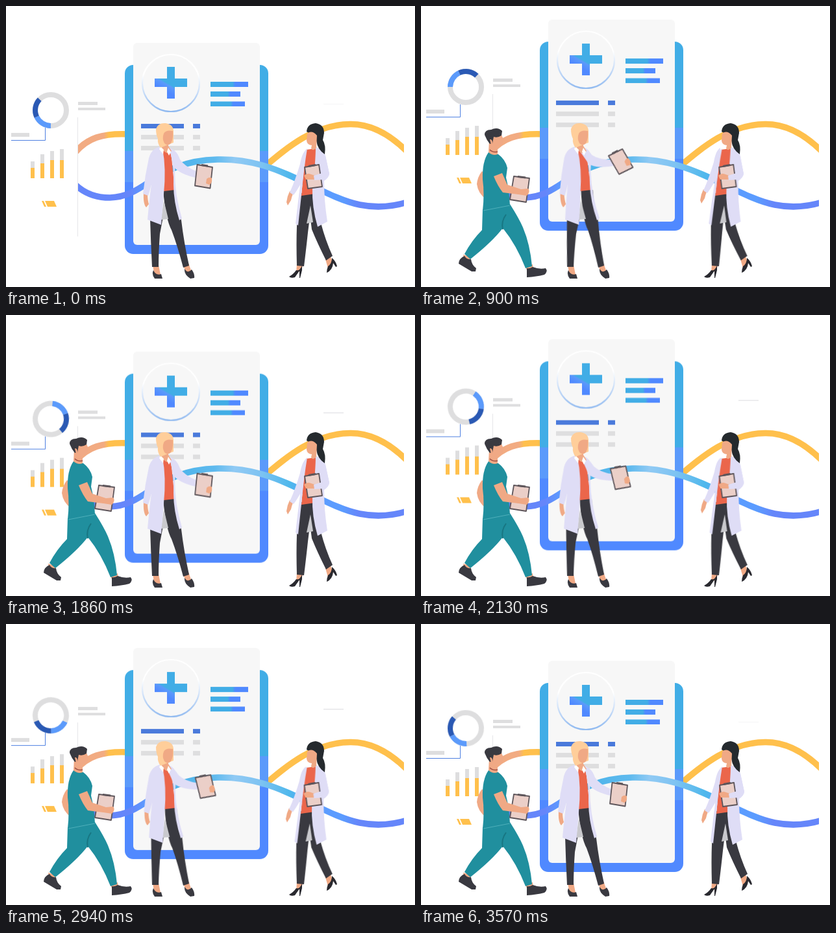
An HTML page for the animation above (3600 ms loop, 630 by 434 pixels).

```html
<!DOCTYPE html>
<html lang="en">
<head>
<meta charset="utf-8">
<title>Medical team</title>
<style>
html, body { margin: 0; width: 100%; height: 100%; overflow: hidden; background: #fff; }
svg { display: block; width: 630px; height: 434px; }

.sway { animation: sway 1800ms infinite; }
@keyframes sway {
  0%, 50% { animation-timing-function: cubic-bezier(.4, 0, .2, 1); }
  50% { transform: var(--to); }
}
.float { --to: translateY(-36px); }
.coatA { --to: skewX(2.1deg); transform-origin: 240px 220px; }
.legsA { --to: skewX(-2.1deg); transform-origin: 240px 405px; }
.armA { --to: translate(-7px, -2px) rotate(-23deg); transform-origin: 258px 228px; }
.boardA { --to: rotate(-13deg); transform-origin: 305px 263px; }
.coatB { --to: skewX(-1.2deg); transform-origin: 470px 210px; }
.armB { --to: translate(-2px, -3px); }
.legsB { --to: skewX(1.2deg); transform-origin: 470px 405px; }

.ring { animation: spin 3600ms linear infinite; transform-origin: 69px 161px; }
@keyframes spin { to { transform: rotate(360deg); } }

.edge { animation: edge 3600ms step-end infinite; }
@keyframes edge { 0% { opacity: .3; } 5% { opacity: 0; } 48% { opacity: 1; } 98% { opacity: .3; } }

.man { animation: enter 3600ms infinite; }
@keyframes enter {
  0% { transform: translateX(-56px); animation-timing-function: ease; }
  19.4%, 100% { transform: none; }
}
.fade { animation: fade 3600ms linear infinite; }
@keyframes fade { 0% { opacity: 0; } 8%, 100% { opacity: 1; } }
.scrub { animation: scrub 3600ms step-end infinite; }
@keyframes scrub { 0% { fill: #42aee4; } 16.7%, 100% { fill: #208f9e; } }

.skin { fill: #f0a985; }
.dark { fill: #393940; }
.coat { fill: #dfddf6; }
.red { fill: #eb664b; }
.grey { fill: #dededf; }
.gold { fill: #ffc04c; }
.teal { fill: #208f9e; }
.board { fill: #ebcfc8; stroke: #5d555a; stroke-width: 1.8; stroke-linejoin: round; }
.line { fill: none; stroke-width: 9.6; }
</style>
</head>
<body>
<svg viewBox="0 0 630 434">
  <defs>
    <linearGradient id="case" x1="0" y1="0" x2="0" y2="1">
      <stop offset=".455" stop-color="#41ade6"/><stop offset=".455" stop-color="#5b9afb"/>
      <stop offset=".62" stop-color="#5b9afb"/><stop offset=".62" stop-color="#5089ff"/>
    </linearGradient>
    <linearGradient id="cross" gradientUnits="userSpaceOnUse" x1="262" y1="104" x2="242" y2="138">
      <stop offset=".5" stop-color="#41ade6"/><stop offset=".56" stop-color="#5b9afb"/>
      <stop offset=".8" stop-color="#5089ff"/>
    </linearGradient>
    <linearGradient id="halo" x1="0" y1="0" x2="0" y2="1">
      <stop offset=".35" stop-color="#fff"/><stop offset="1" stop-color="#8fb9f0"/>
    </linearGradient>
    <linearGradient id="bar">
      <stop offset=".58" stop-color="#41ade6"/><stop offset=".66" stop-color="#5089ff"/>
    </linearGradient>
    <linearGradient id="blue" gradientUnits="userSpaceOnUse" x1="111" y1="0" x2="613" y2="0">
      <stop offset=".16" stop-color="#6586fa"/><stop offset=".21" stop-color="#5b9cff"/>
      <stop offset=".29" stop-color="#4ab3ea"/><stop offset=".42" stop-color="#5fbaee"/>
      <stop offset=".48" stop-color="#90caf4"/><stop offset=".56" stop-color="#7ec3f2"/>
      <stop offset=".65" stop-color="#4fb8ec"/><stop offset=".72" stop-color="#5b9cff"/>
      <stop offset=".81" stop-color="#5b9cff"/><stop offset=".86" stop-color="#6586fa"/>
    </linearGradient>
    <linearGradient id="amber" gradientUnits="userSpaceOnUse" x1="111" y1="0" x2="183" y2="0">
      <stop offset=".55" stop-color="#f2ab82"/><stop offset=".66" stop-color="#ffc04c"/>
    </linearGradient>
    <clipPath id="span"><path d="M111 150H613V330H111Z"/></clipPath>
  </defs>

  <g clip-path="url(#span)">
    <path class="line" stroke="url(#amber)" d="M106 227C125 204 148 196 190 198"/>
    <path class="line" stroke="#ffc04c" d="M396 250C435 217 475 183 530 182.500C562 182 592 199 618 225"/>
  </g>

  <!-- charts -->
  <g class="sway float">
    <path d="M110.500 172V356" stroke="#e6e6e8"/>
    <g class="ring" fill="none" stroke-width="8">
      <circle cx="69" cy="161" r="24" stroke="#dededf"/>
      <path d="M69 185A24 24 0 0 1 47.300 171.100" stroke="#5b9afb"/>
      <path d="M47.300 171.100A24 24 0 0 1 51.700 144.300" stroke="#2a59b4"/>
    </g>
    <path d="M8 207.500H60.500V188" fill="none" stroke="#4c7fe0"/>
    <path class="grey" d="M8 196H36V202H8ZM111 148H141V153H111ZM111 157H153V161H111Z"/>
    <path class="grey" d="M38 240H44V250H38ZM53 229H59V243H53ZM68 224H74V238H68ZM83 221H89V238H83Z"/>
    <path class="gold" d="M38 250H44V266H38ZM53 243H59V266H53ZM68 238H74V266H68ZM83 238H89V266H83Z"/>
    <path class="gold" d="M55 301H58L62 310H59ZM60 301H74L78 310H64Z"/>
  </g>
  <g class="sway float"><path class="edge" d="M489 151.500H520" stroke="#dcdce0"/></g>

  <!-- tablet -->
  <g class="sway float">
    <rect x="183" y="91" width="221" height="292" rx="13" fill="url(#case)"/>
    <rect x="196" y="57" width="195" height="312" rx="6" fill="#f7f7f7"/>
    <circle cx="254" cy="119" r="44" fill="none" stroke="url(#halo)" stroke-width="2.200"/>
    <path d="M248 94H260V112H279V125H260V143H248V125H229V112H248Z" fill="url(#cross)"/>
    <g fill="url(#bar)">
      <rect x="315" y="117" width="58" height="8"/>
      <rect x="315" y="132" width="46" height="8"/>
      <rect x="315" y="147.500" width="53" height="7.500"/>
    </g>
    <path d="M208 182H274V189H208ZM288 182H299V189H288Z" fill="#4a7adb"/>
    <path class="grey" d="M208 199H274V206H208ZM288 199H299V206H288ZM208 216H274V223H208ZM288 216H299V223H288Z"/>
  </g>

  <path clip-path="url(#span)" class="line" stroke="url(#blue)" d="M106 275C122 291 143 296 160 296C202 295 220 265 262 249C300 234 350 233 395 246C450 262 500 298 545 307C570 312 592 311 618 303"/>

  <!-- blonde doctor -->
  <g>
    <path class="skin" d="M226 400H235L238 415L229 418ZM273 400L281 397L286 411L278 415Z"/>
    <path class="dark" d="M227 408Q231 417 239 414L241 421H229Q224 415 227 408ZM275 406Q280 414 286 407Q291 414 290 420L284 421Q274 415 275 406Z"/>
    <g class="sway legsA">
      <path class="dark" d="M222 328L242 326L237 352Q235 380 235 403H225Q223 365 222 328Z"/>
      <path class="dark" d="M242 284H260Q264 315 270 331Q274 365 282 401L273 404Q264 370 255 346Q246 330 242 284Z"/>
    </g>
    <g class="sway coatA">
      <path class="skin" d="M212 288L218 290Q218 300 220 306L216 311Q211 306 212 288Z"/>
      <path fill="#c9c9cd" d="M243 300L250 329L239 330Z"/>
      <path class="red" d="M240 221L254 224L260 284L243 286Z"/>
      <path class="coat" d="M238 217Q224 220 220 235Q214 262 211 290L219 293Q222 284 224 275Q220 305 218 330L239 338L243 290Q247 250 241 220Z"/>
      <path class="coat" d="M250 218Q260 221 262 232L260 255Q260 292 271 328L267 331Q258 302 258 275Q259 240 250 218Z"/>
    </g>
    <g class="sway armA">
      <path class="coat" d="M252 220Q263 222 268 237Q275 248 295 256L292 265Q268 260 258 248Z"/>
      <path class="skin" d="M293 256L314 265L317 271L292 264Z"/>
      <g class="sway boardA">
        <path class="board" d="M294.500 245L318 249L314.500 281.500L291 277.500Z"/>
        <path d="M301 245.500L311 247" stroke="#5d555a" stroke-width="3"/>
        <path class="skin" d="M309 267Q314 263 317 266Q318 274 313 276L308 274Z"/>
      </g>
    </g>
    <path class="skin" d="M240 205H250V216L255 224Q248 232 240 220Z"/>
    <path fill="#fff" d="M238 217L243 222L242 229L236 221ZM250 219L254 225L251 231L248 225Z"/>
    <path fill="#ffce9a" d="M231 190Q234 180 246 181Q259 183 258 196L258 211L250 214L238 219Q233 212 234 205Q231 199 231 190Z"/>
    <path class="skin" d="M243 197Q246 191 257 193Q258 205 254 212Q249 217 244 212Q240 205 243 197Z"/>
  </g>

  <!-- brunette doctor -->
  <g>
    <path class="skin" d="M448 398H458L455 408L447 413ZM492 391L500 387L504 398L496 405Z"/>
    <path fill="#29292f" d="M447 408Q452 410 456 401L456 408L453 420H452V409L445 419Q439 421 436 418Q443 414 447 408ZM496 402Q502 398 502 389Q508 394 510 402L508 403L504 397Q503 408 494 412Q494 407 496 402Z"/>
    <g class="sway legsB">
      <path class="dark" d="M455 289L474 290Q468 320 465 350Q462 378 459 402L448 401Q447 365 448 340Q449 312 455 289Z"/>
      <path class="dark" d="M464 289H476L485 335Q492 362 503 386L493 393Q479 365 471 345Z"/>
    </g>
    <g class="sway armB">
      <path class="skin" d="M437 286L442 290Q440 295 439 300L434 308L432 303Q433 294 437 286Z"/>
      <path class="coat" d="M463 222Q456 226 453 244Q446 268 437 288L443 292Q452 280 459 264Z"/>
    </g>
    <g class="sway coatB">
      <path fill="#c9c9cd" d="M469 308L473 334L463 336Z"/>
      <path class="red" d="M462 222L478 220L476 290L455 293L458 260Z"/>
      <path class="coat" d="M464 220Q457 225 455 240L453 278Q449 308 446 336L450 339L455 292Q459 250 464 220Z"/>
      <path class="coat" d="M477 218Q490 220 492 231L498 259Q497 266 490 270Q490 302 495 333L480 341Q471 310 472 282Q477 240 477 218Z"/>
      <path class="board" d="M460 249L482 245L487 279L465 282Z"/>
      <path d="M466 247.500L477 245.500" stroke="#5d555a" stroke-width="3"/>
      <path class="skin" d="M459 262Q464 257 470 260L476 262L475 268L462 268Z"/>
      <path class="coat" d="M474 262L487 258L485 236L492 231L498 259Q497 266 490 268L475 269Z"/>
    </g>
    <path fill="#252a2e" d="M463 194Q464 182 477 181Q490 183 490 196L488 207Q493 215 491 229Q480 222 478 208L470 198Z"/>
    <path class="skin" d="M464 197Q471 191 479 200L478 219Q473 225 470 220L471 215Q464 215 463 208Z"/>
  </g>

  <!-- nurse -->
  <g class="man"><g class="fade">
    <path class="skin" d="M94 255L102 264L96 277L100 298Q88 290 86 275Q87 264 94 255Z"/>
    <path class="skin" d="M65 384L78 388L74 394L66 390ZM160 401L172 399L173 405L163 408Z"/>
    <path class="dark" d="M67 386Q70 392 77 391Q78 400 85 405L84 410H78L58 398Q58 390 67 386ZM163 405Q167 406 172 403Q182 407 192 405Q196 410 190 415Q178 418 163 419Z"/>
    <path class="teal" d="M95 314L137 306Q151 328 157 342Q168 368 171 402L161 405Q147 369 126 343Q110 364 76 391L67 383Q78 362 94 346Z"/>
    <path d="M131 322Q123 333 126 345" fill="none" stroke="#187682" stroke-width="2"/>
    <path class="scrub" d="M104 226L119 229Q130 237 133 250L131 265Q136 284 137 308L95 316Q98 290 95 268Q94 240 104 226Z"/>
    <path d="M96 316L137 308" stroke="#4fb0bb" stroke-width="1"/>
    <path class="board" d="M143 263L167 266L162 303L137 299Z"/>
    <path d="M149 263.500L161 265" stroke="#5d555a" stroke-width="3"/>
    <path class="skin" d="M112 263L125 258L133 276L154 283L165 282Q169 287 163 293L150 291L126 288Q118 278 112 263Z"/>
    <path class="skin" d="M105 207L118 214V229Q111 232 104 226Z"/>
    <path d="M106 222Q111 227 118 225" fill="none" stroke="#9c4c42" stroke-width="1.500"/>
    <path class="skin" d="M109 199L123 197L127 206L125 214Q121 217 116 216L106 210Z"/>
    <path class="dark" d="M98 199Q98 191 108 191Q118 186 125 193L124 200Q118 204 112 202L110 212L106 213Q101 207 98 199Z"/>
    <path class="skin" d="M106 206Q110 205 110 212L108 214Z"/>
  </g></g>
</svg>
</body>
</html>
```
